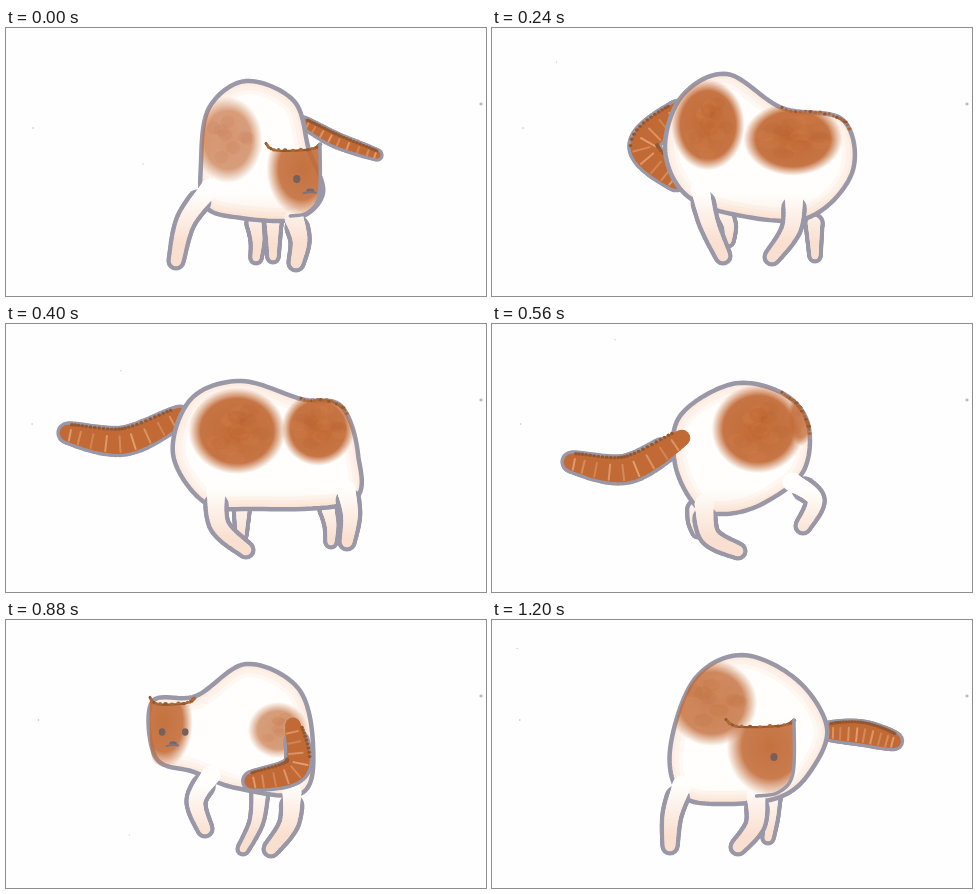
Animation, 480 px wide and 268 px high, one loop 1280 ms. Source, as an HTML page with a canvas:

```html
<!DOCTYPE html>
<html lang="en">
<head>
<meta charset="utf-8">
<title>Turning cat</title>
<style>
html, body { margin: 0; width: 100%; height: 100%; overflow: hidden; background: #fefefe; }
canvas { display: block; width: 480px; height: 268px; }
</style>
</head>
<body>
<canvas id="stage" width="480" height="268"></canvas>
<script>
const ctx = document.getElementById('stage').getContext('2d');
const STEP = 80, STEPS = 16, SEG = 14;
const INK = '#9a97a7', BROWN = '#94582f';
const orange = a => `rgba(194,106,54,${a})`;
const rand = n => { const v = Math.sin(n * 127.1 + 3.7) * 43758.5453; return v - Math.floor(v); };

// Blend numbers, arrays and objects alike.
function mix(a, b, t) {
  if (typeof a === 'number') return a + (b - a) * t;
  if (Array.isArray(a)) return a.map((v, i) => mix(v, b[i], t));
  return Object.fromEntries(Object.keys(a).map(k => [k, mix(a[k], b[k], t)]));
}

// Catmull-Rom through flat x,y values, SEG samples for each span.
function spline(flat, closed = false) {
  const n = flat.length / 2, out = [];
  const at = i => {
    const k = closed ? (i + n) % n : Math.max(0, Math.min(n - 1, i));
    return [flat[2 * k], flat[2 * k + 1]];
  };
  for (let i = 0; i < n - (closed ? 0 : 1); i++) {
    const [a, b, c, d] = [at(i - 1), at(i), at(i + 1), at(i + 2)];
    for (let k = 0; k < SEG; k++) {
      const t = k / SEG;
      out.push([0, 1].map(j => b[j] + t / 2 * (c[j] - a[j] +
        t * (2 * a[j] - 5 * b[j] + 4 * c[j] - d[j] + t * (3 * (b[j] - c[j]) + d[j] - a[j])))));
    }
  }
  if (!closed) out.push(at(n));
  return out;
}

// torso: clockwise from the lower left. legs: hip, foot, bend; two near, two far.
// tail: base, middle, tip. patches: centre, radii, opacity.
// head: centre, half size, lean, gaze. front: the tail passes before the body.
const poses = [];
const pose = (step, torso, legs, tail, girth, front, patches, head) =>
  poses.push({ step, torso, legs, tail, girth, front, patches, head });

pose(0,
  [199,178, 195,135, 203,80, 240,53, 288,73, 303,122, 317,165, 290,191, 235,190],
  [[204,160,170,233,8], [288,190,290,235,-5], [249,195,250,230,-2], [267,195,267,229,0]],
  [297,94, 330,112, 371,127], 7, 0,
  [[222,112,32,40,.7], [180,105,8,30,0]], [287,152,27,36,.9,.64]);
pose(3,
  [192,165, 173,120, 190,68, 235,46, 290,80, 351,92, 360,145, 315,190, 240,186],
  [[208,160,231,228,3], [302,165,280,229,-9], [232,185,236,213,-3], [322,195,323,228,0]],
  [186,83, 152,118, 184,152], 15, 0,
  [[301,111,46,34,1], [216,97,34,42,1]], [352,130,0,30,1,1]);
pose(5,
  [198,178, 167,130, 185,75, 235,57, 295,75, 335,82, 352,130, 345,178, 245,185],
  [[210,165,240,226,13], [340,165,341,218,-4], [236,180,235,211,0], [322,185,325,218,-2]],
  [174,92, 118,117, 62,109], 14, 0,
  [[312,105,34,34,1], [231,107,45,40,1]], [352,130,0,30,1,1]);
pose(7,
  [204,182, 183,140, 188,92, 240,60, 290,69, 316,100, 311,148, 270,180, 232,190],
  [[212,180,246,227,14], [300,158,311,202,-18], [204,185,206,208,2], [285,150,290,160,0]],
  [190,114, 135,145, 80,138], 14, 1,
  [[309,94,12,26,.8], [266,105,43,41,1]], [150,115,0,35,-1,0]);
pose(11,
  [188,152, 150,138, 146,82, 190,76, 240,44, 292,68, 307,125, 296,173, 230,168],
  [[205,155,199,209,12], [286,172,265,229,-8], [254,172,237,229,-5], [270,160,270,168,0]],
  [287,105, 290,148, 246,161], 13, 1,
  [[318,110,10,20,0], [272,110,28,26,.7]], [166,113,22,35,-1,.05]);
pose(13,
  [180,182, 168,135, 180,84, 235,43, 295,53, 326,110, 320,160, 285,192, 222,172],
  [[184,165,185,211,4], [300,178,270,210,-6], [246,182,226,211,-11], [205,170,197,198,-3]],
  [318,117, 355,120, 393,141], 13, 1,
  [[190,75,12,12,0], [318,118,18,24,.6]], [205,122,37,37,-.4,.35]);
pose(15,
  [190,176, 178,130, 202,60, 250,35, 305,60, 335,108, 318,152, 288,177, 235,184],
  [[190,165,178,226,4], [264,175,246,227,-9], [280,178,276,218,-1], [262,160,262,168,0]],
  [336,111, 370,113, 402,121], 12, 0,
  [[220,83,42,40,.85], [340,105,12,20,0]], [268,138,34,38,.9,.91]);
poses.push({ ...poses[0], step: STEPS });

function trace(pts, closed) {
  ctx.beginPath();
  pts.forEach(p => ctx.lineTo(p[0], p[1]));
  if (closed) ctx.closePath();
}

function stroke(color, width) {
  ctx.strokeStyle = color;
  ctx.lineWidth = width;
  ctx.stroke();
}

function dot(x, y, rx, ry, color) {
  ctx.fillStyle = color;
  ctx.beginPath();
  ctx.ellipse(x, y, rx, ry, 0, 0, 7);
  ctx.fill();
}

// A rounded limb along pts, radius(s) at s = 0..1, painted from s = from.
function limb(pts, radius, color, from = 0) {
  const n = pts.length - 1;
  for (let i = Math.ceil(from * n); i <= n; i++) {
    const r = radius(i / n);
    dot(pts[i][0], pts[i][1], r, r, color);
  }
}

// White fur, turning peach towards the feet.
const coat = ctx.createLinearGradient(0, 165, 0, 215);
coat.addColorStop(0, '#fffefc');
coat.addColorStop(1, '#f9dfcf');

function leg([hx, hy, fx, fy, bend], size, open) {
  const d = Math.hypot(fx - hx, fy - hy);
  const kx = (hx + fx) / 2 - (fy - hy) / d * bend, ky = (hy + fy) / 2 + (fx - hx) / d * bend;
  const pts = spline([hx, hy, kx, ky, fx, fy]);
  const radius = grow => s => size * (1.25 - .45 * s) + grow;
  limb(pts, radius(2), INK, open);
  limb(pts, radius(-2.3), coat);
}

// A soft watercolour spot with seeded blotches.
function patch([x, y, rx, ry, alpha], seed) {
  if (alpha < .02) return;
  ctx.save();
  ctx.translate(x, y);
  ctx.scale(rx, ry);
  ctx.globalAlpha = alpha;
  const g = ctx.createRadialGradient(0, 0, 0, 0, 0, 1.08);
  g.addColorStop(0, orange(1));
  g.addColorStop(.5 + .25 * alpha, orange(.93));
  g.addColorStop(1, orange(0));
  dot(0, 0, 1.08, 1.08, g);
  for (let i = 0; i < 16; i++) {
    const a = rand(seed + i) * 6.28, r = rand(seed + i + 40) * .7;
    dot(r * Math.cos(a), r * Math.sin(a), .22, .16, i % 2 ? 'rgba(165,78,30,.1)' : 'rgba(222,145,90,.1)');
  }
  ctx.restore();
}

function fur(pts) {
  pts.forEach(([x, y], k) =>
    dot(x, y + rand(k) * 2 - 1, 1.4 + rand(k + 5), 1.6, k % 3 ? '#ad6836' : BROWN));
}

function tail(pts, girth, front) {
  const radius = grow => s => girth * (.7 + .3 * Math.sin(Math.PI * s)) + grow;
  limb(pts, radius(1.8), INK, front ? .18 : 0);
  limb(pts, radius(-1.5), orange(1));
  const n = pts.length - 1;
  for (let i = 2; i < n; i++) {
    const [x, y] = pts[i];
    const dx = pts[i + 1][0] - pts[i - 1][0], dy = pts[i + 1][1] - pts[i - 1][1];
    const k = radius(-1.5)(i / n) / Math.hypot(dx, dy) * (dx < 0 ? 1 : -1);
    const nx = -dy * k, ny = dx * k;
    dot(x + nx, y + ny, 1.9, 1.7, BROWN);
    if (i % 3) continue;
    ctx.beginPath();
    ctx.moveTo(x + nx * .4, y + ny * .4);
    ctx.lineTo(x - nx * .85, y - ny * .85);
    stroke(`rgba(238,180,135,${.35 + .35 * rand(i)})`, 2);
  }
}

function head([x, y, w, h, lean, gaze]) {
  const place = uv => spline(uv.map((v, i) => i % 2 ? y + v * h : x + v * w));
  const brow = place([-1, -1, -.6, -.82, .6, -.85, 1, -1]);
  const cheek = place([1, -1, .97, .4, .55, .9, -.1, 1]);
  const jaw = place([-.1, 1, -.8, .85, -1, .2, -1, -1]);

  ctx.save();
  trace([...brow, ...cheek, ...jaw], true);
  ctx.clip();
  ctx.translate(x + lean * w * .35, y - h * .3);
  ctx.scale(w, h);
  const g = ctx.createRadialGradient(0, 0, 0, 0, 0, 1.3);
  g.addColorStop(0, orange(.95));
  g.addColorStop(.65, orange(.88));
  g.addColorStop(1, orange(0));
  dot(0, 0, 1.3, 1.3, g);
  ctx.restore();

  trace(brow);
  stroke(BROWN, 2.2);
  fur(brow.filter((p, i) => i % 3 === 0));
  ctx.globalAlpha = Math.min(1, Math.max(0, lean + 1));
  trace(cheek);
  stroke(INK, 3.5);
  ctx.globalAlpha = 1;

  const size = Math.min(4, w / 6);
  for (const u of [gaze - .5, gaze + .55])
    if (u < .95) dot(x + u * w, y - 1, size * .9, size, '#75605c');
  if (gaze < .9) {
    const nx = x + gaze * w, ny = y + h * .3;
    dot(nx, ny, size, size * .6, '#75656c');
    trace([[nx - size * 1.7, ny + 2.5], [nx, ny + 1], [nx + size * 1.4, ny + 2]]);
    stroke('#80717a', 2);
  }
}

function body(torso, patches) {
  trace(torso, true);
  ctx.fillStyle = coat;
  ctx.fill();
  ctx.save();
  ctx.clip();
  for (let w = 10; w <= 26; w += 8) stroke('rgba(247,200,168,.13)', w);
  ctx.restore();
  trace(torso, true);
  stroke(INK, 4.5);
  ctx.save();
  ctx.clip();
  patches.forEach((p, i) => patch(p, 11 + i * 70));
  ctx.restore();
}

function paper(step) {
  ctx.fillStyle = '#fefefe';
  ctx.fillRect(0, 0, 480, 268);
  dot(475, 76, 1.6, 1.4, '#c3b8b8');
  dot(26 + rand(step) * 8, 100, .8, .8, '#bbb');
  dot(rand(step + 20) * 140, rand(step + 30) * 260, .7, .7, '#ccc');
}

function draw(step) {
  const i = poses.findIndex((p, k) => step >= p.step && step < poses[k + 1].step);
  const a = poses[i], b = poses[i + 1];
  const cat = mix(a, b, (step - a.step) / (b.step - a.step));
  const torso = spline(cat.torso, true);
  const front = cat.front > .5;
  const drawTail = () => tail(spline(cat.tail), cat.girth, front);

  ctx.lineCap = ctx.lineJoin = 'round';
  paper(step);
  if (!front) drawTail();
  cat.legs.slice(2).forEach(l => leg(l, 7, 0));
  body(torso, cat.patches);
  cat.legs.slice(0, 2).forEach(l => leg(l, 9.5, .25));
  if (cat.head[2] > 3) head(cat.head);
  else fur(torso.slice(4 * SEG, 5 * SEG + 4));
  if (front) drawTail();
}

const start = performance.now();
function tick() {
  draw(Math.floor((performance.now() - start) / STEP) % STEPS);
  requestAnimationFrame(tick);
}
tick();
</script>
</body>
</html>
```
